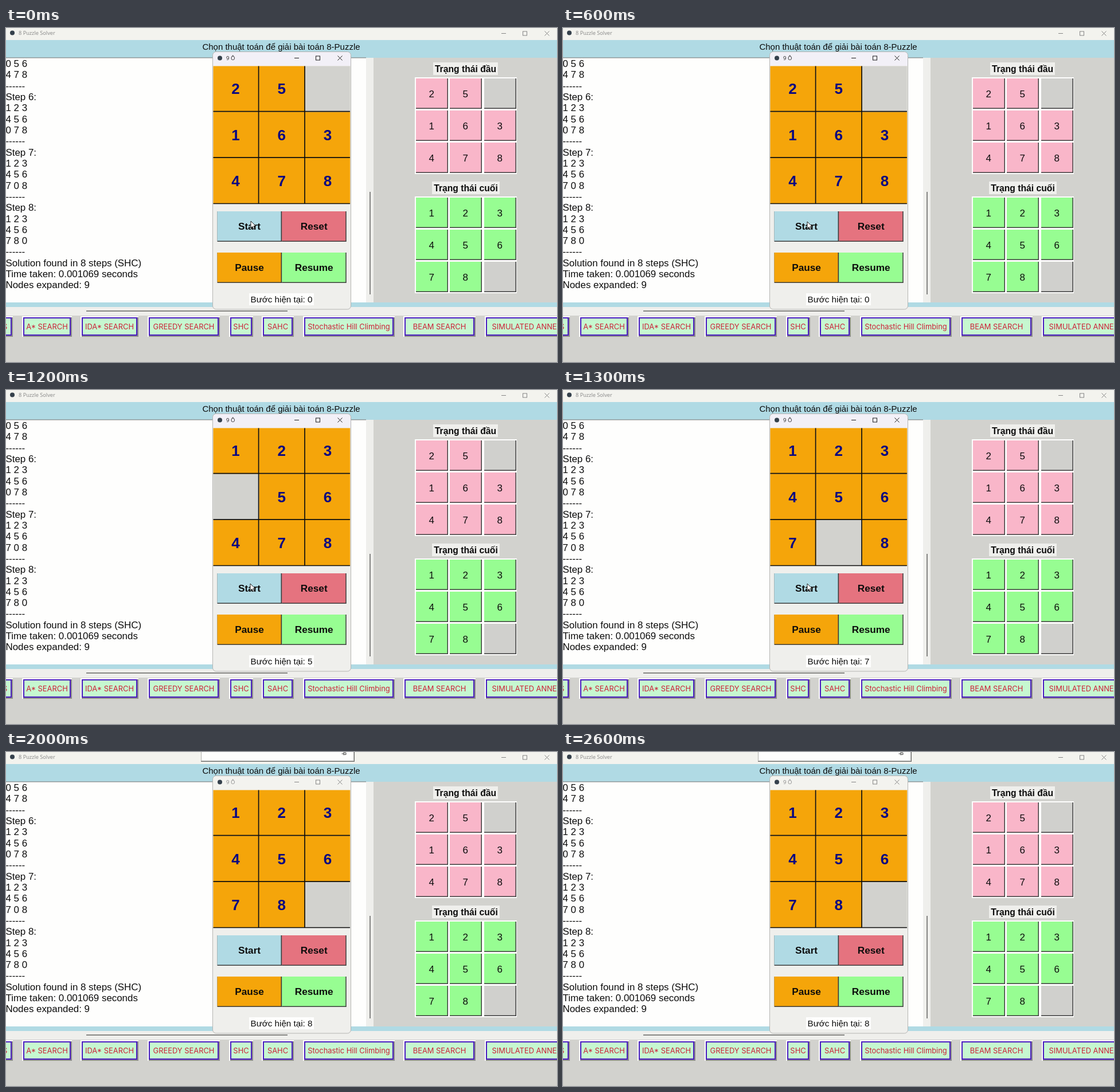
Animation, 961 px wide and 583 px high, one loop 2.7 s. Source, as an HTML page with a canvas:

```html
<!DOCTYPE html>
<html lang="vi">
<head>
<meta charset="utf-8">
<title>8 Puzzle Solver</title>
<style>
html, body { margin: 0; width: 100%; height: 100%; overflow: hidden; background: #d2d2ce; }
canvas { display: block; width: 961px; height: 583px; }
</style>
</head>
<body>
<canvas id="stage" width="961" height="583"></canvas>
<script>
const ctx = document.getElementById('stage').getContext('2d');
const LOOP = 2700;
const SANS = '"Liberation Sans", Arial, sans-serif';
const UI = '"Open Sans", sans-serif';
const INTER = 'Inter, sans-serif';
const C = {
  blue: '#b0dae4', gray: '#d2d2ce', light: '#efefec', orange: '#f5a50a', red: '#e5737f',
  green: '#97fd92', pink: '#f9b6c9', mint: '#c6f8d0', violet: '#4a1cc0', crimson: '#cc2038',
  navy: '#0a0880', ink: '#0c0c0c', white: '#fefefd', shade: '#3c3c3c', dim: '#858585'
};

const START = [2, 5, 0, 1, 6, 3, 4, 7, 8];
const GOAL = [1, 2, 3, 4, 5, 6, 7, 8, 0];
const BLANK_PATH = [2, 5, 4, 1, 0, 3, 6, 7, 8];
const LAST_STEP = BLANK_PATH.length - 1;

const LOG = ['0 5 6', '4 7 8', '------', 'Step 6:', '1 2 3', '4 5 6', '0 7 8', '------',
  'Step 7:', '1 2 3', '4 5 6', '7 0 8', '------', 'Step 8:', '1 2 3', '4 5 6', '7 8 0', '------',
  'Solution found in 8 steps (SHC)', 'Time taken: 0.001069 seconds', 'Nodes expanded: 9'];

const ALGORITHMS = [
  [30, 113, 'A* SEARCH'], [132, 229, 'IDA* SEARCH'], [249, 371, 'GREEDY SEARCH'], [391, 429, 'SHC'],
  [448, 500, 'SAHC'], [520, 676, 'Stochastic Hill Climbing'], [695, 817, 'BEAM SEARCH']];

function rect(x, y, w, h, color) {
  ctx.fillStyle = color;
  ctx.fillRect(x, y, w, h);
}

// y is the middle of the capital letters
function text(str, x, y, size, { color = C.ink, align = 'center', font = SANS, weight = 400 } = {}) {
  ctx.font = `${weight} ${size}px ${font}`;
  ctx.textAlign = align;
  ctx.fillStyle = color;
  ctx.fillText(str, x, y + size * 0.36);
}

function line(points, color, width = 1) {
  ctx.beginPath();
  points.forEach(([x, y], i) => i ? ctx.lineTo(x, y) : ctx.moveTo(x, y));
  ctx.strokeStyle = color;
  ctx.lineWidth = width;
  ctx.stroke();
}

function raised(x, y, w, h, fill) {
  rect(x, y, w + 1, h + 1, C.shade);
  rect(x, y, w - 0.5, h - 0.5, fill);
}

function windowControls(x, y, color) {
  line([[x, y], [x + 8, y]], color);
  ctx.strokeRect(x + 37.5, y - 3.5, 7, 7);
  line([[x + 75.5, y - 4], [x + 83.5, y + 4]], color);
  line([[x + 83.5, y - 4], [x + 75.5, y + 4]], color);
}

function appIcon(x, y) {
  ctx.beginPath();
  ctx.arc(x, y, 4, 0, 2 * Math.PI);
  ctx.fillStyle = '#35414c';
  ctx.fill();
}

function stateGrid(title, labelX, labelW, top, cells, color) {
  rect(labelX, top - 26, labelW, 22, C.light);
  text(title, labelX + labelW / 2, top - 15, 15.7, { weight: 700 });
  rect(713, top, 178, 169, C.white);
  cells.forEach((n, i) => {
    const x = Math.round(715 + (i % 3) * 59.4);
    const y = Math.round(top + 2 + Math.floor(i / 3) * 56.2);
    raised(x, y, 55, 52, n ? color : '#d0d0cd');
    if (n) text(n, x + 27.2, y + 26.5, 17);
  });
}

function algorithmButton(left, right, label, labelX) {
  const w = right - left;
  rect(left - 2, 503, w + 4, 36, C.white);
  rect(left, 505, w + 2, 34, '#8e8e8c');
  rect(left, 505, w, 32, C.violet);
  rect(left + 2, 507, w - 4, 28, C.mint);
  text(label, labelX ?? (left + right) / 2, 521, 12.9, { color: C.crimson, font: INTER, align: labelX ? 'left' : 'center' });
}

function mainWindow() {
  rect(0, 0, 961, 583, C.gray);
  rect(0, 0, 961, 21, '#f3f3ee');
  appIcon(11, 8.5);
  text('8 Puzzle Solver', 22, 9, 9.2, { color: C.dim, align: 'left', font: UI });
  windowControls(864, 9.5, C.dim);

  rect(0, 21, 961, 31, C.blue);
  text('Chọn thuật toán để giải bài toán 8-Puzzle', 480, 33, 15);

  rect(0, 52, 628, 427, C.white);
  rect(0, 51.5, 628, 1, '#777');
  LOG.forEach((row, i) => text(row, -0.5, 62.1 + i * 19.31, 16.9, { align: 'left' }));
  rect(628, 52, 13, 427, C.light);
  rect(634, 286, 2, 179, '#868684');

  stateGrid('Trạng thái đầu', 745, 113, 86, START, C.pink);
  stateGrid('Trạng thái cuối', 743, 118, 294, GOAL, C.green);

  rect(0, 479, 961, 8, C.blue);
  rect(0, 487, 961, 15, C.light);
  rect(140, 493, 351, 2, '#868684');
  algorithmButton(-40, 10, 'S', -6);
  ALGORITHMS.forEach(b => algorithmButton(...b));
  algorithmButton(837, 1000, 'SIMULATED ANNEALING', 847.5);
}

function boardAt(step) {
  const board = START.slice();
  for (let i = 0; i < step; i++) {
    const from = BLANK_PATH[i], to = BLANK_PATH[i + 1];
    [board[from], board[to]] = [board[to], board[from]];
  }
  return board;
}

function puzzleBoard(step) {
  const left = 361.5, top = 66.5, pitch = 80.1;
  boardAt(step).forEach((n, i) => {
    const col = i % 3, row = Math.floor(i / 3);
    const x = left + col * pitch, y = top + row * pitch;
    rect(x, y, col < 2 ? pitch : 78.5, pitch, n ? C.orange : C.gray);
    if (n) text(n, 400.5 + col * 80.3, 106 + row * 80.4, 26, { color: C.navy, weight: 700 });
  });
  for (let i = 1; i <= 3; i++) {
    const y = 65.3 + i * 80.4, x = 360.2 + i * 80.4;
    line([[left, y], [600, y]], C.ink, 1.7);
    if (i < 3) line([[x, top], [x, 307]], C.ink, 1.7);
  }
}

function puzzleWindow(step, active) {
  ctx.beginPath();
  ctx.roundRect(360.5, 41.5, 241, 449.5, 6);
  ctx.fillStyle = C.light;
  ctx.fill();
  ctx.save();
  ctx.clip();
  rect(360, 41, 242, 25, active ? '#f2f0f7' : '#f3f3ef');
  ctx.restore();
  ctx.strokeStyle = '#b4b4b2';
  ctx.lineWidth = 1;
  ctx.stroke();
  appIcon(373, 52.5);
  const titleColor = active ? '#1c1c1c' : C.dim;
  text('9 Ô', 384, 53, 9.5, { color: titleColor, align: 'left', font: UI });
  windowControls(503, 52.5, titleColor);

  puzzleBoard(step);

  [['Start', C.blue], ['Reset', C.red], ['Pause', C.orange], ['Resume', C.green]].forEach(([label, color], i) => {
    const x = 368.5 + (i % 2) * 112.7, y = i < 2 ? 320 : 392;
    raised(x, y, 111.5, 52, color);
    text(label, x + 56, y + 26, 17.2, { weight: 700 });
  });

  rect(424, 463, 113, 21, C.white);
  text('Bước hiện tại: ' + step, 480.5, 473.5, 15.2);
}

function toolbar() {
  rect(340, 0, 268, 17, '#6c6c6a');
  rect(340, 0, 267, 16, '#b0b0ae');
  rect(341, 0, 265, 15, C.white);
  line([[585.5, 3], [589, 3]], '#444');
  line([[589, 0.5], [589, 5.5]], '#444');
  line([[589, 1.5], [593, 1.5], [593, 4.5], [589, 4.5]], '#444');
}

function cursor(x, y) {
  ctx.save();
  ctx.translate(x, y);
  ctx.beginPath();
  [[0, 0], [0, 12], [2.8, 9.5], [4.6, 13.6], [6.5, 12.8], [4.8, 8.8], [8.4, 8.5]].forEach(p => ctx.lineTo(...p));
  ctx.closePath();
  ctx.fillStyle = '#fff';
  ctx.fill();
  ctx.strokeStyle = '#222';
  ctx.lineWidth = 1;
  ctx.stroke();
  ctx.restore();
}

function draw(t) {
  const step = Math.max(0, Math.min(LAST_STEP, Math.floor(2.5 + (t - 1000) * 0.015)));
  const toolbarOpen = t >= 1700;
  mainWindow();
  puzzleWindow(step, !toolbarOpen);
  if (toolbarOpen) toolbar();
  if (t < 1500) cursor(t < 100 ? 427 : 426, t < 100 ? 337 : 338);
}

function tick() {
  // the screen is refreshed ten times a second
  draw(Math.floor(performance.now() % LOOP / 100) * 100);
  requestAnimationFrame(tick);
}
tick();
</script>
</body>
</html>
```
